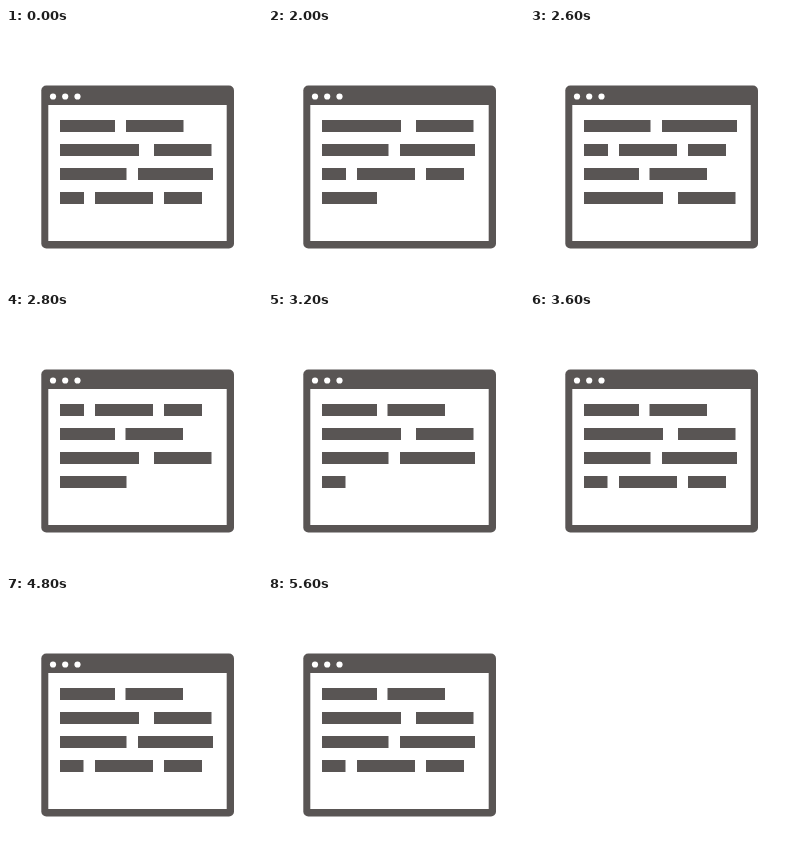
Animation of 256x256 px, one loop 8.6 s. Source, as an HTML page with a canvas:

```html
<!DOCTYPE html>
<html lang="en">
<head>
<meta charset="utf-8">
<style>
  html, body { margin: 0; width: 100%; height: 100%; overflow: hidden; background: #fff; }
  canvas { display: block; }
</style>
</head>
<body>
<canvas id="stage" width="256" height="256"></canvas>
<script>
const ctx = document.getElementById('stage').getContext('2d');
const INK = '#595554', PAPER = '#fff';
const LOOP = 8600, TYPE_START = 2000, STEP = 200;
const LEFT = 54, TOP = 92, LINE = 24, BAR = 12, VISIBLE = 4;

// Each line is a list of [start, end] bars.
const lines = [
  [[54, 109], [120, 177.5]],
  [[54, 133], [148, 205.5]],
  [[54, 120.5], [132, 207]],
  [[54, 78], [89, 147], [158, 196]]
];
const retyped = lines.map(line => line.map(bar => [...bar]));
retyped[0][1] = [119.5, 177];
retyped[3][0][1] = 77.5;

function rect(x, y, w, h, color, radius = 0) {
  ctx.fillStyle = color;
  ctx.beginPath();
  ctx.roundRect(x, y, w, h, radius);
  ctx.fill();
}

function drawWindow() {
  rect(0, 0, 256, 256, PAPER);
  rect(35.3, 57.5, 192.7, 163, INK, 5);
  rect(42.3, 77, 178.4, 136, PAPER);
  ctx.fillStyle = PAPER;
  for (const x of [47, 59.2, 71.5]) {
    ctx.beginPath();
    ctx.arc(x, 68.5, 3.1, 0, Math.PI * 2);
    ctx.fill();
  }
}

// The old lines followed by the first `count` retyped bars.
function typedLines(count) {
  const rows = [...lines];
  for (const line of retyped) {
    if (count <= 0) break;
    rows.push(line.slice(0, count));
    count -= line.length;
  }
  return rows.slice(-VISIBLE);
}

function draw(time) {
  const step = Math.floor((time - TYPE_START) / STEP) + 1;
  drawWindow();
  typedLines(step).forEach((bars, row) => {
    for (const [from, to] of bars) rect(from, TOP + row * LINE, to - from, BAR, INK);
  });
  const blink = step - 10;
  if (blink >= 0 && blink < 9 && blink % 2 === 0) {
    rect(LEFT, TOP + VISIBLE * LINE, 8, BAR, INK);
  }
}

let start;
function tick(now) {
  start ??= now;
  draw((now - start) % LOOP);
  requestAnimationFrame(tick);
}
draw(0);
requestAnimationFrame(tick);
</script>
</body>
</html>
```
